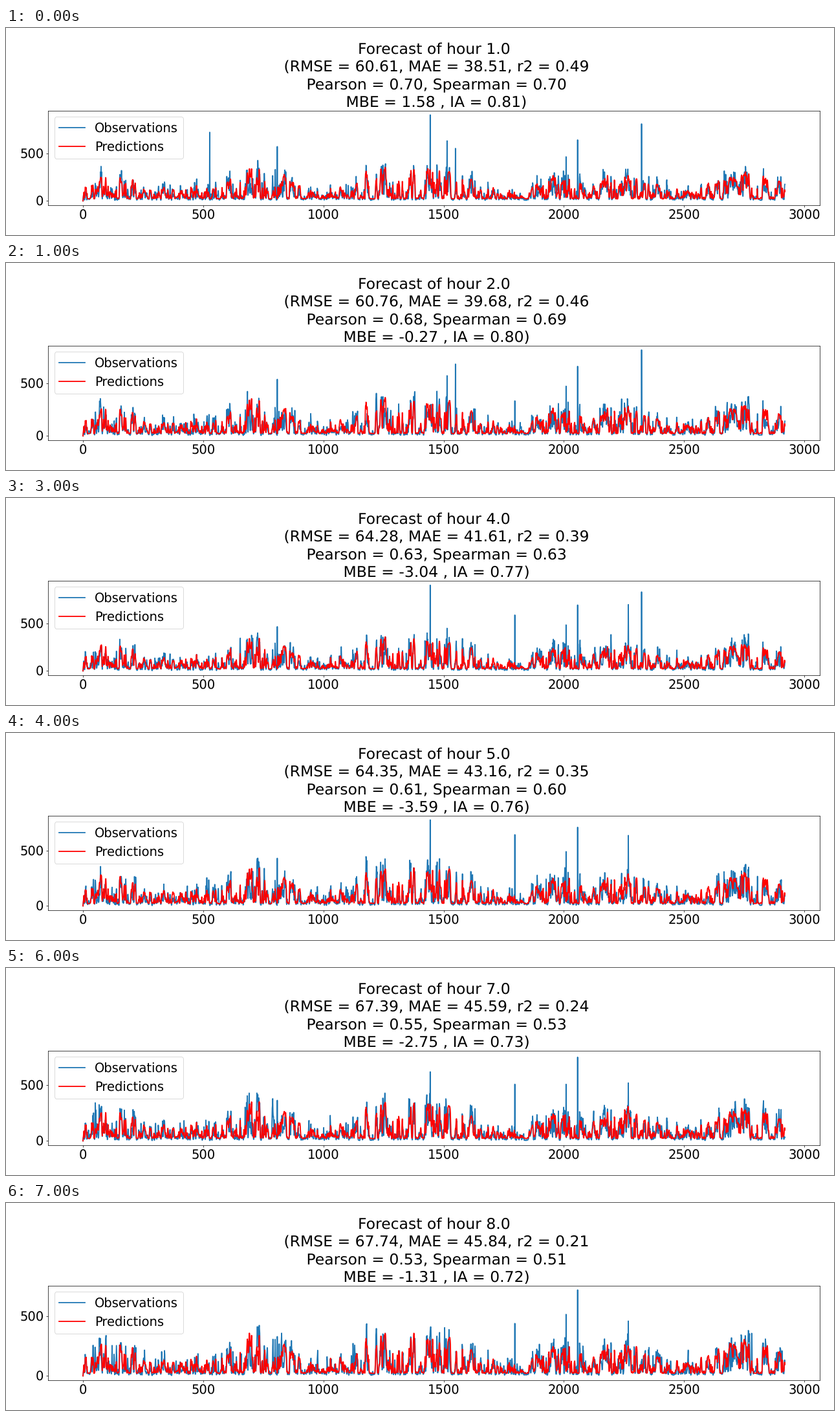
Write a matplotlib script that moves like this. It is 1280 by 320 pixels and loops after 8 s.

```python
import numpy as np
import matplotlib.pyplot as plt
from matplotlib.animation import FuncAnimation

W, H, DPI = 1280, 320, 64
LEFT, RIGHT, TOP, BOTTOM = 64.8, 1258.3, 127.7, 274
N = 2920
HOURS = 8
t = np.arange(N)

# Scores and highest observation at these hours; the others are interpolated
KEY_HOURS = (1, 2, 4, 5, 7, 8)
SCORES = {
    "RMSE": (60.61, 60.76, 64.28, 64.35, 67.39, 67.74),
    "MAE": (38.51, 39.68, 41.61, 43.16, 45.59, 45.84),
    "r2": (0.49, 0.46, 0.39, 0.35, 0.24, 0.21),
    "Pearson": (0.70, 0.68, 0.63, 0.61, 0.55, 0.53),
    "Spearman": (0.70, 0.69, 0.63, 0.60, 0.53, 0.51),
    "MBE": (1.58, -0.27, -3.04, -3.59, -2.75, -1.31),
    "IA": (0.81, 0.80, 0.77, 0.76, 0.73, 0.72),
    "peak": (902, 814, 908, 781, 772, 721),
}

# Seasonal height of the daily peaks: (time, value)
SEASON = [
    (0, 210), (190, 190), (260, 110), (415, 95), (425, 190), (560, 120),
    (710, 280), (820, 220), (930, 85), (1130, 140), (1180, 280),
    (1370, 250), (1480, 260), (1680, 125), (1780, 120), (1830, 40),
    (1900, 170), (2050, 210), (2110, 110), (2210, 240), (2400, 115),
    (2540, 85), (2650, 170), (2790, 240), (2919, 130),
]

# Isolated tall observations: (time, first hour, last hour, heights there)
BURSTS = [
    (527, 1, 1, 720, 720), (808, 1, 8, 570, 330), (1444, 1, 1, 902, 902),
    (1444, 3, 7, 1000, 620), (1514, 1, 4, 630, 450), (1549, 1, 2, 551, 680),
    (1796, 2, 4, 332, 590), (1796, 5, 8, 647, 440), (2009, 1, 8, 463, 516),
    (2057, 1, 8, 640, 770), (2268, 4, 8, 700, 460), (2323, 1, 4, 808, 834),
]


def smooth_noise(rng, sigma):
    """Unit-variance noise with a correlation length of sigma samples."""
    k = np.arange(-4 * sigma, 4 * sigma + 1)
    kernel = np.exp(-0.5 * (k / sigma) ** 2)
    kernel /= np.sqrt(np.sum(kernel ** 2))
    return np.convolve(rng.standard_normal(N), kernel, mode="same")


shared = np.random.default_rng(11)
level = np.interp(t, *zip(*SEASON))
mix = 0.8 * smooth_noise(shared, 4) + 0.6 * smooth_noise(shared, 1)
rank = np.argsort(np.argsort(mix)) / N
base = 22 + np.maximum(1.35 * level - 22, 10) * rank ** 2
base *= np.minimum(1, t / 8)
common = smooth_noise(shared, 1)


def series(hour, peak):
    """Observed and predicted values for one forecast hour."""
    rng = np.random.default_rng(100 + hour)
    pred = base * (1 + 0.04 * smooth_noise(rng, 3))

    spread = 0.5 + 0.015 * hour
    gain = np.exp(spread * (0.75 * common + 0.66 * smooth_noise(rng, 1)))
    cap = 1.25 * level + 110 * rng.random(N) ** 2
    obs = np.clip(0.85 * base * gain, 4, cap)
    obs[0] = 0
    for x, first, last, start, end in BURSTS:
        if first <= hour <= last:
            obs[x] = np.interp(hour, (first, last), (start, end))
    return np.minimum(obs, peak), pred


def title_lines(hour, s):
    return (
        f"Forecast of hour {hour:.1f}",
        f" (RMSE = {s['RMSE']:.2f}, MAE = {s['MAE']:.2f}, r2 = {s['r2']:.2f}",
        f" Pearson = {s['Pearson']:.2f}, Spearman = {s['Spearman']:.2f}",
        f" MBE = {s['MBE']:.2f} , IA = {s['IA']:.2f})",
    )


plt.rcParams.update({"font.family": "DejaVu Sans", "font.size": 22,
                     "text.hinting": "none"})
fig = plt.figure(figsize=(W / DPI, H / DPI), dpi=DPI, facecolor="white")
ax = fig.add_axes([LEFT / W, 1 - BOTTOM / H,
                   (RIGHT - LEFT) / W, (BOTTOM - TOP) / H])
obs_line, = ax.plot([], [], color="#1f77b4", lw=2, label="Observations")
pred_line, = ax.plot([], [], color="red", lw=2, label="Predictions")
ax.legend(loc="upper left")
ax.set_xlim(-0.05 * (N - 1), 1.05 * (N - 1))
ax.set_xticks(range(0, 3001, 500))
ax.set_yticks([0, 500])

center = (LEFT + RIGHT) / 2 / W
titles = [
    fig.text(center, 1 - (39.7 + 27.5 * row) / H, "", ha="center",
             va="baseline", fontsize="large")
    for row in range(4)
]


def draw(i):
    hour = i + 1
    scores = {name: np.interp(hour, KEY_HOURS, values)
              for name, values in SCORES.items()}
    peak = scores["peak"]
    obs, pred = series(hour, peak)
    obs_line.set_data(t, obs)
    pred_line.set_data(t, pred)
    ax.set_ylim(-0.05 * peak, 1.05 * peak)
    for text, line in zip(titles, title_lines(hour, scores)):
        text.set_text(line)
    return [obs_line, pred_line, *titles]


anim = FuncAnimation(fig, draw, frames=HOURS, interval=1000,
                     repeat=True, repeat_delay=0, blit=False)
plt.show()
```
